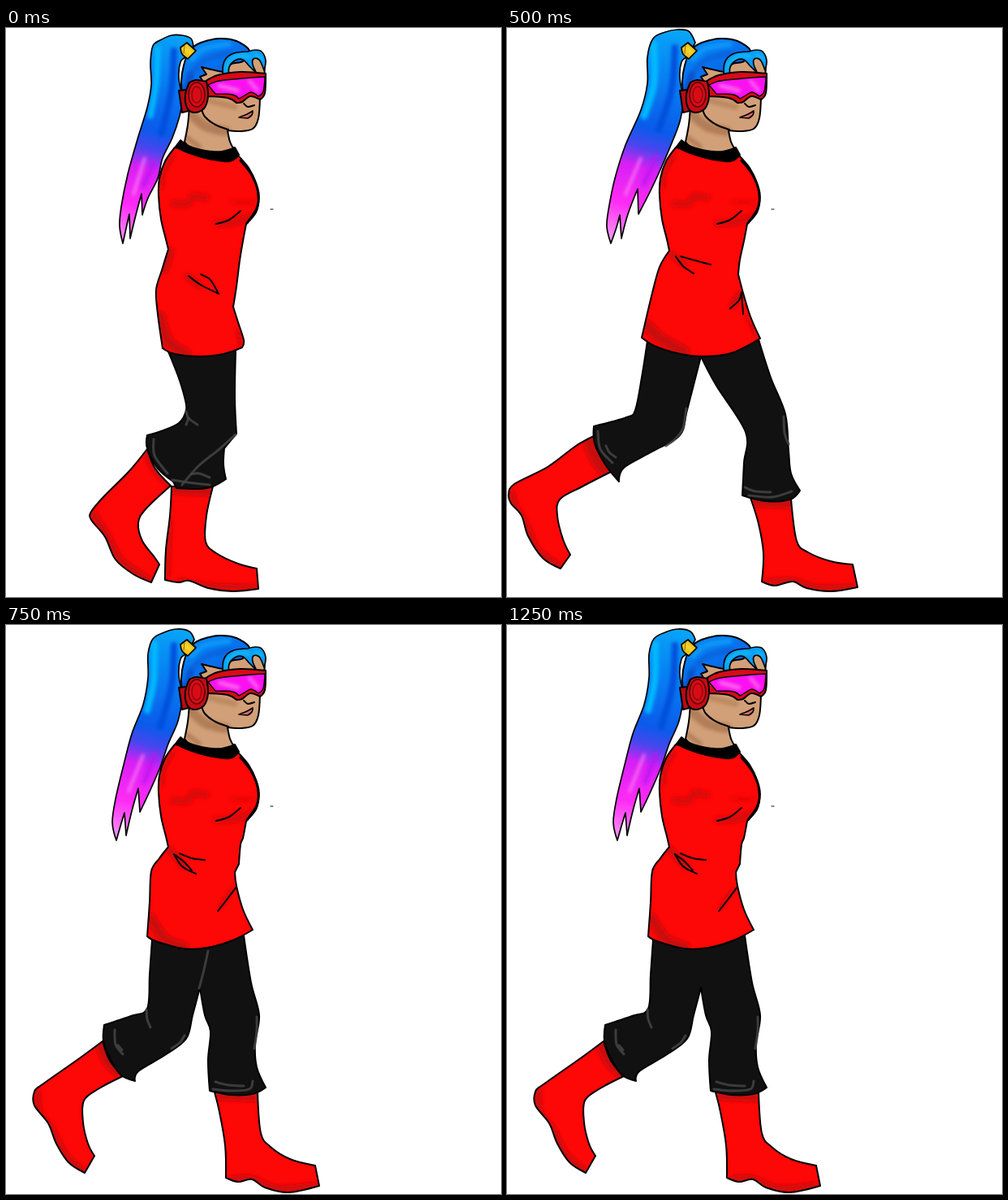
Recreate the animation shown at these times as an HTML page. Size 610 by 700 pixels, loop 1500 ms.

```html
<!DOCTYPE html>
<html lang="en">
<head>
<meta charset="utf-8">
<title>Walk cycle</title>
<style>
  html, body { margin: 0; width: 100%; height: 100%; overflow: hidden; background: #fff; }
  svg { display: block; width: 610px; height: 700px; }
</style>
</head>
<body>
<svg id="stage" viewBox="0 0 610 700" fill="none" stroke-linecap="round" stroke-linejoin="round">
  <defs>
    <linearGradient id="tail" gradientUnits="userSpaceOnUse" x1="212" y1="5" x2="140" y2="265">
      <stop offset="0" stop-color="#08a5f8"/>
      <stop offset=".2" stop-color="#0783f3"/>
      <stop offset=".46" stop-color="#0a5bea"/>
      <stop offset=".55" stop-color="#4a45ee"/>
      <stop offset=".64" stop-color="#d71ff4"/>
      <stop offset=".82" stop-color="#ff2bf5"/>
      <stop offset="1" stop-color="#f59af2"/>
    </linearGradient>
    <linearGradient id="cap" x1="0" y1="0" x2=".7" y2="1">
      <stop offset="0" stop-color="#068df2"/>
      <stop offset=".5" stop-color="#0870ee"/>
      <stop offset="1" stop-color="#084fc4"/>
    </linearGradient>
    <filter id="soft" x="-100" y="-100" width="810" height="900" filterUnits="userSpaceOnUse">
      <feGaussianBlur stdDeviation="2.2"/>
    </filter>
  </defs>
</svg>
<script>
const NS = "http://www.w3.org/2000/svg";
const stage = document.getElementById("stage");
const RED = "#fd0707", DARK_RED = "#c90909", BLACK = "#000", SKIN = "#d2a078";
let clipCount = 0;

function add(parent, tag, attrs = {}) {
  const node = document.createElementNS(NS, tag);
  for (const key in attrs) node.setAttribute(key, attrs[key]);
  parent.append(node);
  return node;
}

// Smooth curve through "x,y" points; a trailing "!" makes a sharp corner.
function curve(text, closed = false) {
  const pts = text.trim().split(/\s+/).map(word => {
    const [x, y] = word.replace("!", "").split(",").map(Number);
    return { x, y, sharp: word.endsWith("!") };
  });
  const n = pts.length;
  const at = i => closed ? pts[(i + n) % n] : pts[Math.max(0, Math.min(n - 1, i))];
  const handle = (i, sign) => {
    const p = at(i), k = p.sharp ? 0 : sign / 6;
    return `${p.x + (at(i + 1).x - at(i - 1).x) * k},${p.y + (at(i + 1).y - at(i - 1).y) * k}`;
  };
  let d = `M${pts[0].x},${pts[0].y}`;
  for (let i = 0; i < (closed ? n : n - 1); i++) {
    d += `C${handle(i, 1)} ${handle(i + 1, -1)} ${at(i + 1).x},${at(i + 1).y}`;
  }
  return closed ? d + "Z" : d;
}

function line(parent, points, color = BLACK, width = 2, extra = {}) {
  return add(parent, "path", { d: curve(points), stroke: color, "stroke-width": width, ...extra });
}

// A filled, outlined shape with soft strokes clipped inside it.
function shape(parent, points, fill, shades = [], width = 2) {
  const d = curve(points, true);
  add(parent, "path", { d, fill });
  if (shades.length) {
    const id = "clip" + clipCount++;
    add(add(parent, "clipPath", { id }), "path", { d });
    const inside = add(parent, "g", { "clip-path": `url(#${id})` });
    for (const [pts, color, w, opacity = 1] of shades) {
      line(inside, pts, color, w, { filter: "url(#soft)", opacity });
    }
  }
  add(parent, "path", { d, stroke: BLACK, "stroke-width": width });
}

function glints(parent, list) {
  for (const pts of list) line(parent, pts, "#444", 3, { opacity: .85 });
}

const poses = {
  passing: {
    tail: "231,24! 228,13 217,9 204,9 190,15 181,22 178,43 179,70 174,98 162,137 150,180 142,220 140,244 144,265! 149,242 152,229! 153,259! 160,230 167,204! 168,230! 175,209 187,185 193,160 205,135 214,108 218,86! 213,62 215,42 222,36!",
    tailShades: [["187,25 185,68 178,108", "#06b9ff", 7], ["207,28 204,75 192,130", "#0650dc", 8], ["171,160 157,205", "#ff7cf5", 3], ["182,166 169,195", "#b616ef", 4]],
    hips: "200,272! 192,298 185,322 187,352 193,394! 208,401 239,404 268,401 291,393! 293,384 286,362 280,343! 284,318 288,286",
    hipShades: [["201,276 194,296", DARK_RED, 12], ["190,355 200,385 222,401", DARK_RED, 12], ["224,306 238,316", DARK_RED, 8], ["286,372 289,391", DARK_RED, 4]],
    folds: ["225,305 240,316 262,327", "240,303 252,310 262,327"],
    trousers: "200,398! 212,428 220,454 222,470 213,486 191,496 174,501! 174,517 187,542 206,558! 210,566! 238,567 255,564 271,555! 268,537 269,517! 284,499! 282,455 283,397!",
    glints: [],
    backBoot: "174,518! 151,546 120,577 105,595 105,605 122,626 135,654 157,672 179,682! 189,660! 183,651 168,631 163,609 172,592 203,563! 184,542",
    backShades: [["176,524 186,543 202,559", DARK_RED, 12], ["108,598 125,625 141,654 175,679", DARK_RED, 8]],
    frontBoot: "204,564! 202,600 197,642 196,679! 213,682 226,680 249,689 279,693 311,690! 309,665! 286,659 259,646 246,632 247,600 255,564!",
    frontShades: [["205,568 250,571", DARK_RED, 10], ["202,605 199,674", DARK_RED, 5], ["215,680 252,686 306,688", DARK_RED, 6]]
  },
  stride: {
    tail: "232,18! 226,8 211,5 195,9 181,17 175,36 175,65 169,98 155,134 145,172 135,214 131,243 136,265! 142,244 146,231! 148,259! 155,229 163,201! 165,230! 176,207 190,175 200,146 212,118 218,86! 213,62 215,42 222,36!",
    tailShades: [["183,23 182,68 174,105", "#06b9ff", 8], ["207,25 204,75 190,125", "#0650dc", 8], ["169,160 151,205", "#ff7cf5", 3], ["184,158 170,194", "#b616ef", 4]],
    hips: "200,273! 189,287 179,303 177,341 174,383! 185,389 218,398 248,397 279,388 304,375! 292,350 284,321 282,304! 287,294! 289,270",
    hipShades: [["202,277 220,297", DARK_RED, 8], ["178,360 196,386 220,396", DARK_RED, 11], ["280,325 264,347", DARK_RED, 4]],
    folds: ["207,282 217,297 234,306", "207,282 219,291 229,302", "214,281 229,287 245,289", "284,322 272,338 261,352"],
    trousers: "180,387! 177,430 174,472 154,481 121,492! 120,511 127,531 141,553 159,561! 163,549 196,529 222,509 230,480 239,446! 245,480 252,500 249,535 251,573! 276,578 304,577 320,569! 309,544 307,515 312,480 302,440 293,382!",
    glints: ["173,473 174,485 178,495", "134,498 135,516 144,528", "138,517 143,523", "220,505 214,514 204,521", "309,482 309,500 306,521", "258,562 274,566 293,567", "255,571 278,573 300,571 304,561"],
    backBoot: "119,512! 92,532 45,565 35,574 35,591 52,613 62,638 77,661 97,674! 109,653! 101,638 95,612 96,585 115,570 144,555! 128,536",
    backShades: [["119,517 130,538 147,553", DARK_RED, 18], ["39,574 41,599 58,622 72,650 96,672", DARK_RED, 7]],
    frontBoot: "257,575! 263,599 270,640 271,680! 286,685 303,682 319,692 348,698 386,690! 381,665! 350,657 326,642 314,625 310,575!",
    frontShades: [["260,580 307,582", DARK_RED, 9], ["278,681 302,680 333,692 380,689", DARK_RED, 6]]
  },
  reach: {
    tail: "232,18! 224,4 210,2 195,5 180,13 173,36 173,68 165,101 146,144 133,185 125,224 123,245 128,265! 135,245 139,230! 141,259! 149,229 161,198! 162,229! 176,202 190,172 202,144 213,115 218,86! 213,62 215,42 222,36!",
    tailShades: [["181,20 181,68 169,108", "#06b9ff", 9], ["207,24 203,75 187,125", "#0650dc", 8], ["165,160 146,205", "#ff7cf5", 3], ["184,158 168,193", "#b616ef", 4]],
    hips: "200,274! 188,294 179,326 166,381! 184,392 214,401 241,404 276,400 312,382! 300,355 291,326 285,303! 287,285",
    hipShades: [["203,278 218,292", DARK_RED, 7], ["171,365 190,382 218,398", DARK_RED, 13], ["286,328 278,342", DARK_RED, 8], ["296,355 308,380", DARK_RED, 4]],
    folds: ["208,281 217,293 230,302", "214,281 232,286 251,291", "289,325 286,335 275,345", "289,326 290,338 291,352"],
    trousers: "173,385! 166,430 158,470 147,479 107,490! 108,511 121,537 138,558! 144,541 179,521 213,501 222,470 239,404! 258,440 294,497 292,535 290,575! 318,582 349,580 361,569! 350,548 347,520 343,475 325,430 310,383!",
    glints: ["112,496 115,518 130,535", "122,514 126,522 134,528", "221,468 217,492 208,505 196,514", "341,478 342,498 347,512", "293,565 306,570 325,571", "298,575 327,577 351,570"],
    backBoot: "107,502! 85,514 50,540 9,561 2,574 5,585 18,600 26,625 44,652 66,665! 78,648! 69,629 62,600 65,580 91,565 128,546! 117,527",
    backShades: [["104,502 117,529 129,544", DARK_RED, 28], ["5,571 12,591 24,611 37,641 65,662", DARK_RED, 7]],
    frontBoot: "300,578! 310,610 316,646 314,681! 330,686 352,681 369,689 399,693 432,688! 426,660! 399,656 371,645 357,631 350,579!",
    frontShades: [["302,584 349,586", DARK_RED, 10], ["320,681 351,679 382,688 428,687", DARK_RED, 6]]
  }
};

function drawLegs(parent, pose) {
  shape(parent, pose.backBoot, RED, pose.backShades);
  shape(parent, pose.frontBoot, RED, pose.frontShades);
  shape(parent, pose.trousers, "#111");
  glints(parent, pose.glints);
}

function drawTorso(parent, pose) {
  const torso = `208,147! 196,164 189,185 188,206 191,235 197,260 ${pose.hips} 292,262 296,241! 308,227 311,212 308,191 299,172 286,157!`;
  shape(parent, torso, RED, [
    ["205,157 193,179 192,195", DARK_RED, 5],
    ["207,216 224,216 231,207 246,209", DARK_RED, 8, .75],
    ["278,214 306,215", DARK_RED, 4, .5],
    ["260,240 281,239 302,232", DARK_RED, 8, .75],
    ...pose.hipShades
  ]);
  line(parent, "289,163 303,181 311,203 309,222 297,240", BLACK, 3);
  line(parent, "259,241 275,236 289,225");
  pose.folds.forEach(pts => line(parent, pts));
}

function drawHead(parent) {
  shape(parent, "226,96! 224,119 220,140! 240,158 270,160 281,149! 276,140 273,126! 288,127 304,124 311,111 313,85! 318,58! 316,42 290,32 248,43 238,55", SKIN, [
    ["227,105 246,121 271,127", "#b17e58", 12],
    ["223,135 238,146", "#b17e58", 6],
    ["249,89 282,97", "#bb885f", 7]
  ]);
  line(parent, "240,97 245,109 258,119 274,125");
  line(parent, "293,93 298,97 306,95");
  add(parent, "path", { d: curve("287,110! 297,106 304,102! 303,107 298,111!", true), fill: "#d66b68", stroke: BLACK, "stroke-width": 1.7 });
  shape(parent, "209,146! 215,138! 227,146 246,151 266,152 282,147! 287,156! 275,164 250,161 226,154", BLACK);

  // Hair
  shape(parent, "218,90! 216,66 219,46 226,28 240,18 263,13 284,16 300,28 292,41 278,44 267,54! 253,51 241,48! 247,57! 239,60! 243,66! 230,76", "url(#cap)", [
    ["229,38 245,25 274,20", "#0796f8", 7],
    ["225,59 246,39 275,31", "#0858d0", 5, .7],
    ["221,77 228,58", "#074cc0", 6]
  ]);
  shape(parent, "298,29! 281,31 270,39 267,54 271,65! 278,67 282,63! 275,56 276,46 284,39 292,39 299,46! 309,56! 304,45 305,38 312,39 318,52! 320,40 315,29 307,27", "#0a9af4", [
    ["275,57 273,45 285,35 300,35", "#12bcfc", 4],
    ["307,33 315,38", "#12bcfc", 4]
  ], 1.7);
  shape(parent, "215,24! 223,18! 234,28! 224,38! 217,32", "#eac21a", [["220,24 228,31", "#ffe43b", 3]], 1.7);
  line(parent, "220,22 219,31", "#8a6808", 1);

  // Visor
  shape(parent, "245,66! 261,58 289,54 320,56! 319,80 313,88! 301,84 291,91 284,92! 273,86 248,84!", "#d80b18");
  shape(parent, "249,70! 263,65 291,62 319,60! 317,78 311,84! 302,79 294,83 287,87! 279,82 258,81!", "#fb10f0", [
    ["263,71 286,77", "#ff78ef", 4],
    ["300,65 310,77", "#ff69f2", 4]
  ], 1.4);
  shape(parent, "213,77! 222,76! 225,102! 217,104!", "#b90b13");
  shape(parent, "226,67! 234,64 247,66! 249,84 244,99 232,104 223,98 221,82", "#c70b14");
  add(parent, "ellipse", { cx: 235, cy: 82, rx: 10, ry: 15, fill: "#d80c16", stroke: "#510509", "stroke-width": 1.5 });
  add(parent, "ellipse", { cx: 235, cy: 82, rx: 6, ry: 10, stroke: "#8d0910", "stroke-width": 1.5 });
}

function drawFigure(pose) {
  const group = add(stage, "g", { visibility: "hidden" });
  shape(group, pose.tail, "url(#tail)", pose.tailShades, 1.7);
  drawLegs(group, pose);
  const skin = add(group, "g");
  drawHead(skin);
  // The shirt overlaps the neck but stays below the collar band.
  const shirt = document.createElementNS(NS, "g");
  group.insertBefore(shirt, skin);
  drawTorso(shirt, pose);
  line(group, "326,223 329,223", BLACK, 1);
  return group;
}

function extraMarks(figure, marks) {
  const group = add(figure, "g");
  glints(group, marks);
  return group;
}

const passing = drawFigure(poses.passing);
const stride = drawFigure(poses.stride);
const reach = drawFigure(poses.reach);
const cycle = [passing, stride, reach, stride, passing, stride];

// Trouser highlights that appear only on certain steps.
const marks = {
  0: extraMarks(passing, [
    "222,472 225,480 236,488", "225,480 222,488", "182,506 183,526 199,548",
    "283,500 263,518 237,539 217,562", "228,549 238,548 251,553", "205,556 224,559 251,562"
  ]),
  3: extraMarks(stride, ["249,401 244,424 238,447"]),
  4: extraMarks(passing, [
    "222,476 214,508 203,547", "222,476 225,492 231,509", "283,452 278,489 268,515 266,541",
    "181,506 184,528 201,551", "208,545 221,549 238,548", "203,547 209,557 229,560 251,562"
  ])
};

const STEP = 250;

function render(time) {
  const step = Math.floor(time / STEP) % cycle.length;
  for (const figure of [passing, stride, reach]) {
    figure.setAttribute("visibility", figure === cycle[step] ? "visible" : "hidden");
  }
  for (const key in marks) {
    marks[key].setAttribute("display", Number(key) === step ? "inline" : "none");
  }
}

const start = performance.now();
function tick() {
  render(performance.now() - start);
  requestAnimationFrame(tick);
}
render(0);
requestAnimationFrame(tick);
</script>
</body>
</html>
```
